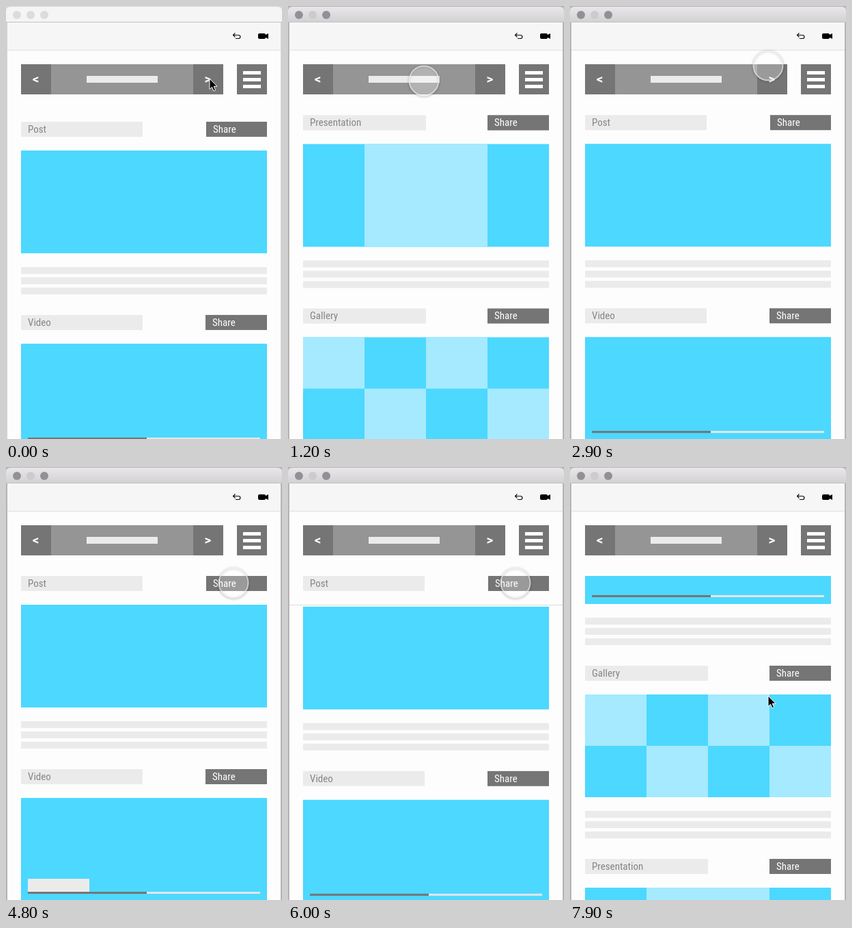
Recreate the animation shown at these times as an HTML page. Size 404x632 px, loop 8 s.

```html
<!DOCTYPE html>
<html lang="en">
<meta charset="utf-8">
<title>Feed prototype</title>
<style>
  html, body { margin: 0; width: 100%; height: 100%; overflow: hidden; background: #b4b4b4; }
  svg { display: block; }
  text { font: 15px "Roboto Condensed", Roboto, "Liberation Sans Narrow", sans-serif; font-stretch: condensed; }
  .nav { font: bold 19px Roboto, sans-serif; text-anchor: middle; fill: #fff; }
</style>
<svg width="404" height="632" viewBox="0 0 404 632">
  <defs>
    <linearGradient id="bar" x2="0" y2="1">
      <stop stop-color="#e9e7e9"/><stop offset="1" stop-color="#d3d1d3"/>
    </linearGradient>
    <clipPath id="view"><path d="M2 159H402V632H2Z"/></clipPath>
    <filter id="blur" x="-30%" y="-30%" width="160%" height="160%"><feGaussianBlur stdDeviation="1.5"/></filter>
  </defs>

  <rect id="edge" width="404" height="632" fill="#b4b4b4"/>
  <path d="M2 24H402V626Q402 632 396 632H8Q2 632 2 626Z" fill="#fdfdfd"/>
  <path id="title" d="M0 23V7Q0 1 7 1H397Q404 1 404 7V23Z"/>
  <path d="M0 23.5H404" stroke="#c4c2c4"/>
  <g id="lights"><circle cx="16" cy="13" r="6"/><circle cx="36" cy="13" r="6"/><circle cx="56" cy="13" r="6"/></g>
  <path d="M2 24H402V64H2Z" fill="#f6f6f6"/>
  <path d="M2 64.5H402" stroke="#e0e0e0"/>
  <path d="M335.5 39.5L332.5 42.5L335.5 45.5M333 42.5H340Q343 42.5 343 45T340 47.5H336" fill="none" stroke="#111" stroke-width="1.2"/>
  <path d="M370.5 40H378Q380 40 380 42L384 40V48L380 46Q380 48 378 48H371Q369 48 369 46V42Q369 40 371 40Z"/>

  <g clip-path="url(#view)"><g id="pageA"></g><g id="pageB"></g></g>

  <path d="M22 85H318V129H22Z" fill="#959595"/>
  <path d="M22 85H66V129H22ZM274 85H318V129H274ZM338 85H382V129H338Z" fill="#757575"/>
  <path d="M118 102H222V112H118Z" fill="#ebebeb"/>
  <path d="M347 95H373V100H347ZM347 105H373V110H347ZM347 115H373V120H347Z" fill="#fff"/>
  <text class="nav" x="43.5" y="113">&lt;</text>
  <text class="nav" x="295.5" y="113">&gt;</text>

  <path id="arrow" d="M0 0V15.5L3.5 12.3L6 18L8.6 16.9L6.2 11.3H11Z" stroke="#fff"/>
  <g id="touch">
    <circle cy="1" r="22" fill="none" stroke="#000" stroke-opacity=".25" stroke-width="2" filter="url(#blur)"/>
    <circle r="21.5" fill="#fff" fill-opacity=".27" stroke="#f4f4f4" stroke-opacity=".65" stroke-width="2"/>
  </g>
</svg>
<script>
const $ = id => document.getElementById(id);
const BLUE = '#4dd8ff', PALE = '#a5eaff', DARK = '#757575', LIGHT = '#ebebeb';
const GAP = 282, PANEL = 100;

const rect = (x, y, w, h, fill, extra = '') =>
  `<rect x="${x}" y="${y}" width="${w}" height="${h}" fill="${fill}" ${extra}/>`;

const media = {
  Post: () => '',
  Video: y => rect(32, y + 137, 174, 3, DARK) + rect(206, y + 137, 166, 3, '#e6e6e6'),
  Gallery: y => [0, 1, 2, 3].map(i => rect(22 + 90 * i, y + 75 * (i % 2), 90, 75, PALE)).join(''),
  Presentation: y => rect(112, y, 180, 150, PALE)
};

function heading(name, y) {
  const w = name.length > 5 ? 180 : 178, x = name === 'Post' ? 293 : 292;
  return rect(22, y, w, 22, LIGHT, 'rx="1"') + rect(x, y, 382 - x, 22, DARK) +
    `<text x="32" y="${y + 16}" fill="#858585">${name}</text>` +
    `<text x="${x + 10}" y="${y + 16}" fill="#fff">Share</text>`;
}

const body = (name, y) => rect(22, y + 42, 360, 150, BLUE) + media[name](y + 42) +
  [212, 227, 242].map(d => rect(22, y + d, 360, 10, LIGHT, 'rx="1"')).join('');

const sections = names => names.map((n, i) =>
  heading(n, 159 + GAP * i) + body(n, 159 + GAP * i)).join('');

const sheet = rect(2, 159, 400, 1200, '#fdfdfd');
$('pageA').innerHTML = sheet + heading('Post', 159) +
  `<g id="panel">${rect(2, 201, 400, 1, '#dcdcdc')}</g><g id="below">` + body('Post', 159) +
  ['Video', 'Gallery', 'Presentation'].map((n, i) =>
    heading(n, 441 + GAP * i) + body(n, 441 + GAP * i)).join('') +
  rect(32, 601, 90, 19, LIGHT, 'id="tip"') + '</g>';
$('pageB').innerHTML = sheet + sections(['Presentation', 'Gallery', 'Video', 'Post']);

// Eased value along keys of [time, ...values]
function track(keys, t) {
  const i = keys.findIndex(k => k[0] > t);
  if (i < 1) return keys.at(i).slice(1);
  const a = keys[i - 1], b = keys[i];
  const u = (t - a[0]) / (b[0] - a[0]), s = u * u * (3 - 2 * u);
  return a.slice(1).map((v, k) => v + (b[k + 1] - v) * s);
}

const pointer = [
  [0, 298, 106], [300, 298, 109], [800, 199, 109], [1200, 199, 109], [1700, 180, 109],
  [2200, 180, 109], [2700, 290, 87], [3100, 290, 87], [3450, 360, 110], [3800, 333, 169],
  [6250, 333, 169], [7100, 283, 500], [7120, 283, 500], [7430, 283, 77],
  [7550, 283, 77], [7880, 290, 334]
];
const scroll = [[0, 0], [7120, 0], [7430, 429], [7800, 433]];
const panel = [[0, 0], [4850, 0], [5300, PANEL], [5650, PANEL], [6040, 0]];
const tip = [[0, 0], [4500, 0], [4700, 1], [4850, 1], [5000, 0]];

// Pages glide in from below and settle exponentially
const enter = (t, start) => t < start ? 473 : 473 * Math.exp((start - t) / 90);
const move = (id, x, y) => $(id).setAttribute('transform', `translate(${x} ${y})`);
const show = (id, on) => $(id).setAttribute('display', on ? 'inline' : 'none');

function draw(t) {
  const active = t >= 300;
  $('edge').setAttribute('fill', active ? '#b4b4b4' : '#d2d2d2');
  $('title').setAttribute('fill', active ? 'url(#bar)' : '#f5f5f5');
  [...$('lights').children].forEach((c, i) =>
    c.setAttribute('fill', !active ? '#dcdcdc' : i === 1 ? '#cdcbcd' : '#929095'));

  const backToA = t >= 2200;
  const front = $(backToA || t < 580 ? 'pageA' : 'pageB');
  if (front.parentNode.lastChild !== front) front.parentNode.append(front);
  const aY = backToA ? enter(t, 2200) : t < 580 ? enter(t, -347) : 0;
  move('pageA', 0, aY - track(scroll, t)[0]);
  move('pageB', 0, backToA ? 0 : enter(t, 580));

  const [h] = track(panel, t);
  move('below', 0, h);
  show('panel', h > 0);
  $('tip').setAttribute('opacity', track(tip, t)[0]);

  const [x, y] = track(pointer, t);
  const pressed = t >= 300 && t < 7550;
  show('touch', pressed);
  show('arrow', !pressed);
  move(pressed ? 'touch' : 'arrow', x, y);
}

(function frame() {
  draw(performance.now() % 8000);
  requestAnimationFrame(frame);
})();
</script>
</html>
```
